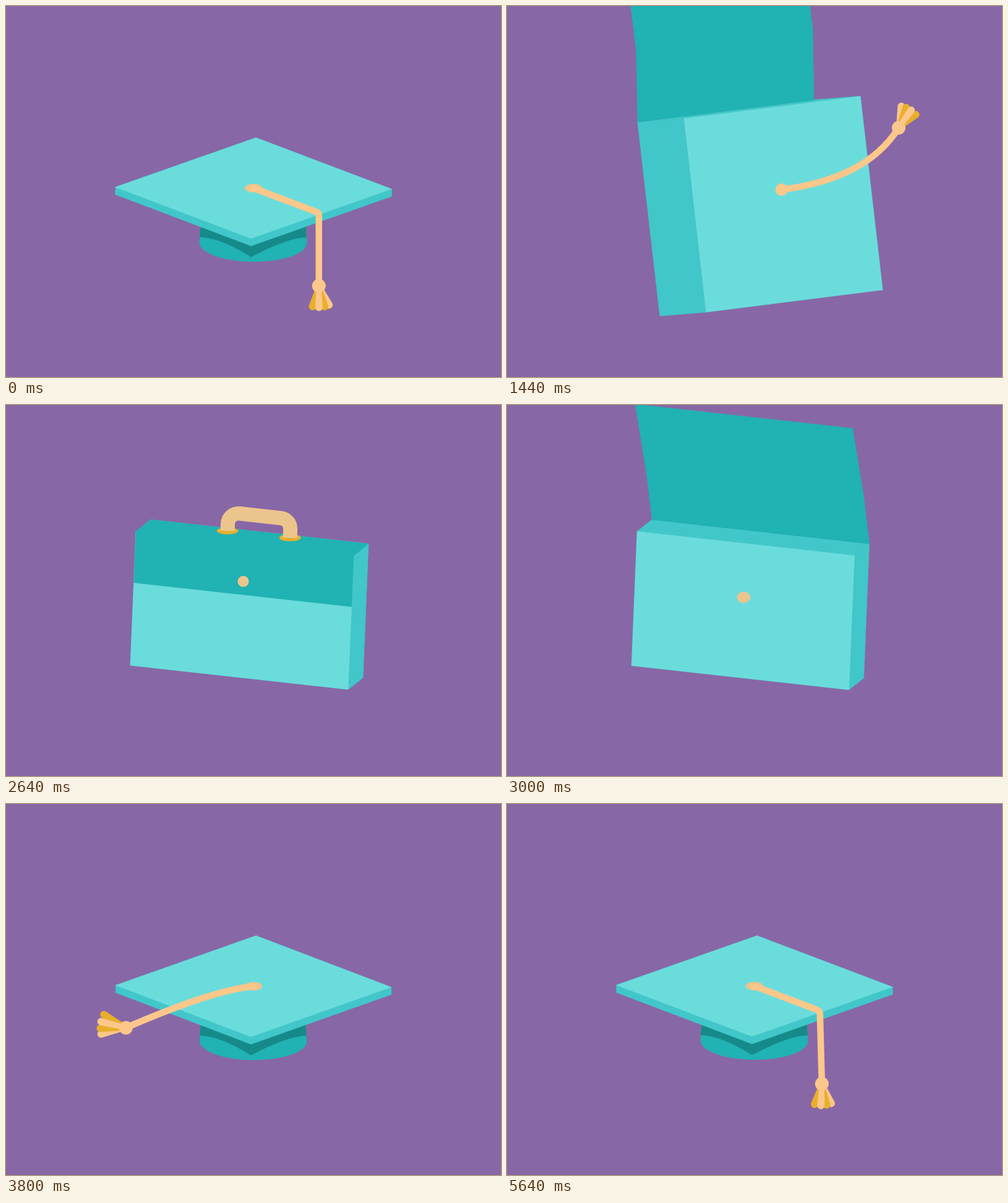
These frames come from a looping animation (800 px wide and 600 px high, 5.68 s). An HTML page with a canvas:

```html
<!DOCTYPE html>
<html lang="en">
<head>
<meta charset="utf-8">
<title>Cap and briefcase</title>
<style>
html, body { margin: 0; height: 100%; overflow: hidden; background: #8867a6; }
canvas { display: block; }
</style>
</head>
<body>
<canvas id="stage" width="800" height="600"></canvas>
<script>
const ctx = document.getElementById('stage').getContext('2d');
const LOOP = 5680;
const C = { bg: '#8867a6', face: '#6bdcdc', side: '#41c7c9', teal: '#21b2b3', shade: '#168a8a',
  cord: '#fcc78a', gold: '#e9af2b', tan: '#ecc58c' };

// Key poses: centre, half of the top edge, half of the left edge, depth (x, y pairs).
const CAP = [400, 294.5, 109.5, 41.5, -113.5, 40, 0, 12];
const DIP = [397, 321, 124, 18.5, -95.5, 56.5, 0, 12];
const OPEN = [446.5, 320.5, 142.5, -18, 18, 156.5, -75, 6];
const CASE = [381.5, 332.5, 175.5, 19.5, -4.5, 108.5, 24, -19];

const clamp = x => Math.max(0, Math.min(1, x));
const ease = (t, from, to) => {
  const x = clamp((t - from) / (to - from));
  return x * x * (3 - 2 * x);
};
const during = (t, a, b, c, d) => ease(t, a, b) - ease(t, c, d);
const blend = (a, b, x) => a.map((v, i) => v + (b[i] - v) * x);
const add = (p, q, s = 1) => [p[0] + q[0] * s, p[1] + q[1] * s];
const spring = (t, start, period, decay) => t < start ? 0 :
  Math.exp((start - t) / decay) * Math.sin((t - start) / period * 2 * Math.PI);

function boardPose(t) {
  let pose = blend(CAP, DIP, ease(t, 440, 720));
  pose = blend(pose, OPEN, ease(t, 760, 1410));
  pose = blend(pose, CASE, ease(t, 1460, 1780));
  pose = blend(pose, CAP, ease(t, 3000, 3260));
  // Each landing stretches the board wide and settles.
  const k = .1 * (spring(t, 1740, 400, 250) + spring(t, 3180, 400, 250));
  const [x, y, ux, uy, vx, vy, dx, dy] = pose;
  return {
    c: [x, y - 100 * k],
    u: [ux * (1 + k), uy * (1 - k)],
    v: [vx * (1 + k), vy * (1 - k)],
    d: [dx, dy]
  };
}

// Angle of the hanging cord away from straight down, in degrees; positive is left.
const swing = t => t < 3000
  ? 10 * ease(t, 440, 720) - 105 * ease(t, 760, 1140) - 53 * ease(t, 1120, 1380)
  : 62 * ease(t, 3040, 3200) + 68 * ease(t, 3280, 3560) - 130 * ease(t, 3560, 4050)
    - 102 * spring(t, 4000, 1600, 700);
const down = degrees => {
  const a = degrees * Math.PI / 180;
  return [-Math.sin(a), Math.cos(a)];
};

function poly(color, ...pts) {
  ctx.fillStyle = ctx.strokeStyle = color;
  ctx.lineWidth = .6;
  ctx.beginPath();
  pts.forEach(p => ctx.lineTo(...p));
  ctx.closePath();
  ctx.fill();
  ctx.stroke();
}

function oval(color, [x, y], rx, ry) {
  ctx.fillStyle = color;
  ctx.beginPath();
  ctx.ellipse(x, y, rx, ry, 0, 0, 7);
  ctx.fill();
}

function drawCrown(c, across, tip, size) {
  const w = 2 * Math.hypot(...across), angle = Math.atan2(across[1], across[0]);
  const cos = Math.cos(angle), sin = Math.sin(angle);
  const drop = 189 - .226 * w, rx = .195 * w * size;
  const mid = add(c, [-sin * drop, cos * drop]);
  const [x, y] = add(tip, mid, -1);
  ctx.save();
  ctx.translate(...mid);
  ctx.rotate(angle);
  ctx.beginPath();
  ctx.moveTo(rx * .96, -50);
  ctx.lineTo(rx, 0);
  ctx.ellipse(0, 0, rx, 31 * size, 0, 0, Math.PI);
  ctx.lineTo(-rx * .96, -50);
  ctx.fillStyle = C.teal;
  ctx.fill();
  ctx.clip();
  ctx.fillStyle = C.shade;
  ctx.beginPath();
  ctx.moveTo(-rx, -60);
  ctx.lineTo(-rx, -8);
  ctx.quadraticCurveTo(-rx * .62, -8, x * cos + y * sin, y * cos - x * sin);
  ctx.quadraticCurveTo(rx * .66, -9, rx, -9);
  ctx.lineTo(rx, -60);
  ctx.fill();
  ctx.restore();
}

function drawTassel(t, knot, u) {
  const out = 1 - during(t, 1340, 1720, 3040, 3180);
  if (out < .02) return;
  const left = during(t, 3060, 3200, 3560, 4150);
  const size = Math.min(1, out * 3), angle = swing(t);
  const round = Math.min(1, .03 + Math.abs(angle) / 95 + left);
  const corner = add(knot, blend([u[0] * .965, u[1] * .965], [-164, -13], left), size);
  const head = add(corner, down(angle), (118 + 55 * left) * out);

  ctx.strokeStyle = C.cord;
  ctx.lineWidth = 10.5 * size;
  ctx.lineCap = ctx.lineJoin = 'round';
  ctx.beginPath();
  ctx.moveTo(...knot);
  ctx.lineTo(...blend(corner, knot, round));
  ctx.quadraticCurveTo(...corner, ...blend(corner, head, round));
  ctx.lineTo(...head);
  ctx.stroke();

  // The strands trail a little behind the cord.
  const trail = 90 + swing(t - 100);
  for (const [turn, color] of [[17, C.gold], [-28, C.cord], [-15, C.gold], [0, C.cord]]) {
    ctx.save();
    ctx.translate(...head);
    ctx.rotate((trail + turn) * Math.PI / 180);
    ctx.fillStyle = color;
    ctx.beginPath();
    ctx.moveTo(0, -4 * size);
    ctx.arc((35 + 10 * left) * size, 0, 6 * size, -Math.PI / 2, Math.PI / 2);
    ctx.lineTo(0, 4 * size);
    ctx.fill();
    ctx.restore();
  }
  oval(C.cord, head, 11 * size, 11 * size);
}

function drawHandle(edge, u, size) {
  if (size < .02) return;
  const a = add(edge, u, .732), b = add(edge, u, 1.306);
  const top = [a, b].map(p => add(p, [1, -30], size));
  for (const foot of [a, b]) oval(C.gold, foot, 17.5 * size, 5.5 * size);
  ctx.strokeStyle = C.tan;
  ctx.lineWidth = 23 * size;
  ctx.lineCap = 'butt';
  ctx.beginPath();
  ctx.moveTo(...a);
  ctx.arcTo(...top[0], ...top[1], 17 * size);
  ctx.arcTo(...top[1], ...b, 17 * size);
  ctx.lineTo(...b);
  ctx.stroke();
}

function draw(t) {
  ctx.fillStyle = C.bg;
  ctx.fillRect(0, 0, 800, 600);

  const { c, u, v, d } = boardPose(t);
  const face = [[-1, -1], [1, -1], [1, 1], [-1, 1]].map(([i, j]) => add(add(c, u, i), v, j));
  const back = face.map(p => add(p, d));
  const shut = during(t, 1540, 1780, 2900, 3060);
  const flap = during(t, 1160, 1380, 3080, 3210);
  const crown = 1 - during(t, 1080, 1200, 3170, 3260);
  const handle = during(t, 1740, 1880, 2900, 3000) * (1 + .3 * spring(t, 1800, 400, 200));

  if (crown > .02) drawCrown(c, add(u, v, -1), add(back[2], [0, 18]), crown);
  face.forEach((p, i) => {
    const j = (i + 1) % 4;
    poly(C.side, p, face[j], back[j], back[i]);
  });
  poly(C.face, ...face);

  const upright = clamp((v[1] - 40) / 110);
  const knot = add(c, v, -(.15 * upright + .34 * shut));
  const drawKnot = () => {
    const [rx, ry] = blend([14 - 4 * upright, 7 + 3 * upright], [9, 9], shut);
    oval(upright > .1 && !shut ? C.cord : C.tan, knot, rx, ry);
  };
  drawKnot();
  drawTassel(t, knot, u);

  // The flap hinges on the back edge and folds over the front.
  if (flap > .01) {
    const fold = [0, 1].map(i => blend(add(back[i], [-2, -115], flap), face[i], shut));
    const rim = fold.map(p => blend(add(p, [-25, -200], flap), add(p, v, .765), shut));
    poly(C.teal, back[0], back[1], fold[1], fold[0]);
    poly(C.teal, fold[0], fold[1], rim[1], rim[0]);
    if (shut > .05) drawKnot();
  }
  drawHandle(add(face[0], d, .8), u, handle);
}

function tick() {
  draw(performance.now() % LOOP);
  requestAnimationFrame(tick);
}
tick();
</script>
</body>
</html>
```
